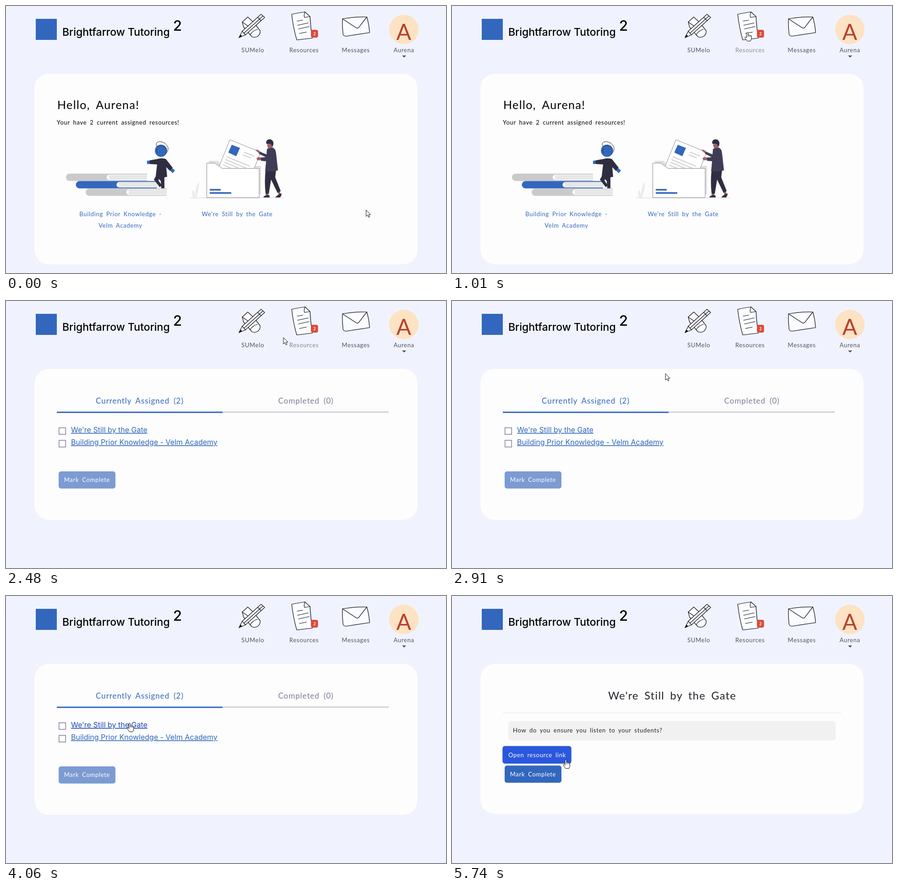
Recreate the animation shown at these times as an HTML page. Size 961 by 583 pixels, loop 6.29 s.

```html
<!DOCTYPE html>
<html lang="en">
<head>
<meta charset="utf-8">
<title>Learning dashboard</title>
<style>
  html, body { margin: 0; width: 100%; height: 100%; overflow: hidden; background: #f0f3fd; }
  svg { display: block; width: 100%; height: 100%; }
  text { font: 13px Lato, sans-serif; letter-spacing: .055em; word-spacing: .22em; }
  .mid { text-anchor: middle; }
  .nav text { fill: #51515c; }
  .brand { font: 500 23px Inter, sans-serif; letter-spacing: 0; word-spacing: 0; }
  .link { font: 16px Inter, sans-serif; letter-spacing: 0; word-spacing: 0; text-decoration: underline; fill: #2f66b9; }
  .tab { font-size: 17px; }
  .blue { fill: #3267bd; }
  .white { fill: #fff; }
  .dark { fill: #2f2e41; }
  .skin { fill: #a0616a; }
  .sketch { fill: none; stroke: #16161f; stroke-width: 1.25; stroke-linecap: round; stroke-linejoin: round; }
  .sketch .paper { fill: #fbfcff; }
  .shadow { fill: #d5dff4; }
  .rule { fill: none; stroke: #c4c4c6; }
</style>
</head>
<body>
<svg viewBox="0 0 961 583">
  <rect width="961" height="583" fill="#f0f3fd"/>

  <rect class="blue" x="65" y="28" width="46" height="46"/>
  <text class="brand" x="123" y="65">Brightfarrow Tutoring</text>
  <text class="brand" x="365" y="54" style="font-size:31px">2</text>

  <g class="sketch">
    <path class="paper" d="M516 35L528 24L541 36L555 54Q556 61 550 66Q543 70 537 67L519 46Z"/>
    <path d="M516 35L529 44L541 36M533 63Q538 54 549 51"/>
    <path class="paper" d="M509 69L516 55L557 18L565 25L523 63Z"/>
    <path d="M516 55L523 63M520 59L561 22M550 25L557 32"/>
    <path d="M509 69L512 63L515 66Z" fill="#16161f"/>
  </g>

  <path class="shadow" d="M626 21L656 15L666 25L671 71L637 76Z"/>
  <g class="sketch">
    <path class="paper" d="M624 18Q638 15 653 13L664 23Q665 48 669 70Q652 72 635 74Q627 46 624 18Z"/>
    <path d="M653 13Q650 20 652 25L664 23M636 33L648 31M637 42L660 37M639 50L662 45M641 60L656 57"/>
  </g>
  <rect x="666" y="52" width="15.5" height="17" rx="4" fill="#dc4b3b"/>
  <text class="mid white" x="674" y="64" style="font-size:9px;font-weight:700">2</text>

  <path class="shadow" d="M737 30L790 25L795 60L742 67Z"/>
  <g class="sketch">
    <path class="paper" d="M735 28Q762 23 788 24Q793 40 794 58Q768 62 742 66Q735 65 736 58Q734 42 735 28Z"/>
    <path d="M735 28Q750 38 764 47Q768 50 771 46L788 24"/>
  </g>

  <circle cx="869" cy="51.3" r="32.2" fill="#fde3c3"/>
  <text class="mid" x="870" y="73.5" style="font-size:48px;fill:#b7402f">A</text>
  <path d="M865 108H874L869.5 112.5Z" fill="#51515c"/>
  <g class="nav mid">
    <text x="539" y="101">SUMelo</text>
    <text id="resources" x="651" y="101">Resources</text>
    <text x="764" y="101">Messages</text>
    <text x="869" y="101">Aurena</text>
  </g>

  <rect id="card" x="62" y="148" width="837" height="416" rx="32" fill="#fdfdfe"/>

  <g class="screen">
    <text x="112" y="225" style="font-size:25px">Hello, Aurena!</text>
    <text x="111" y="259">Your have 2 current assigned resources!</text>

    <g id="books"></g>
    <circle class="blue" cx="338.5" cy="316" r="13.3"/>
    <path d="M330 308Q324 297 336 296Q349 297 354 309Q355 319 347 323M330 308Q336 301 344 306Q352 311 350 317M331 311Q327 317 332 321" fill="none" stroke="#2f2e41"/>
    <path class="blue" d="M308 338L315 337V345L308 345ZM362 353L369 359L364 365L358 359Z"/>
    <path class="dark" d="M314 337L331 334Q340 331 349 334L353 339L364 353L358 360L350 352L352 373L346 374V398H339L338 382L334 378L333 381L340 391L336 396L323 379L327 372L330 346L314 345Z"/>

    <path class="rule" d="M401 419H608" stroke-width=".7"/>
    <path d="M408 418Q404 404 409 401Q412 406 413 416Q413 392 422 384Q421 405 415 418Z" fill="#ececec"/>
    <path d="M443 343V338H463L471 349H557V411H553V419H443Z" fill="#e1e1e3"/>
    <path d="M489 292L556 319L540 360L464 354Z" fill="#fff" stroke="#8e8e96"/>
    <path class="blue" d="M493 303L511 310L503 328L485.500 320Z"/>
    <path class="rule" stroke-width="1.6" d="M520 319L542 328M517 325L535 332M482 329L533 350M479 335L524 354M477 341L508 354M474 347L491 354"/>
    <path d="M438.500 343H456L472 354.500H553V418.500H438.500Z" fill="#fff" stroke="#85858f"/>
    <path class="blue" d="M445 399.500H469V403H445ZM445 406.500H492V410H445Z"/>

    <path class="skin" d="M570 302H582L581 313H573ZM544 314L550 314L558 320L555 324ZM547 332L551 330L560 331V336L549 337ZM567 408H573V415H567ZM593 406L598 404L600 412L596 414Z"/>
    <path class="dark" d="M568 298Q569 291 576 291Q585 292 584 302L582 308L579 302L569 301ZM567 357H590L588 374L600 404L593 408L579 379L574 410H567Q564 385 567 357ZM562 418Q563 413 575 413L576 418ZM588 418Q593 412 601 409L602 412L599 418Z"/>
    <path d="M554 318L569 324L570 312L582 309Q589 311 590 323L594 359L583 361H566L568 339L557 338V331L567 330L553 323Z" fill="#3f3d56"/>

    <g class="mid blue">
      <text x="250" y="459">Building Prior Knowledge -</text>
      <text x="250" y="484">Velm Academy</text>
      <text x="505" y="459">We're Still by the Gate</text>
    </g>
  </g>

  <g class="screen">
    <text class="tab mid blue" x="292" y="224">Currently Assigned (2)</text>
    <text class="tab mid" x="655" y="224" fill="#7d7b96">Completed (0)</text>
    <path d="M473 242.500H836" stroke="#8b8a9c"/>
    <path d="M111 243H473" stroke="#3267bd" stroke-width="3"/>
    <path d="M115.750 276.750h14.500v14.500h-14.500zM115.750 304.250h14.500v14.500h-14.500z" fill="#fff" stroke="#827f97" stroke-width="1.500"/>
    <text id="lesson" class="link" x="142" y="287">We're Still by the Gate</text>
    <text class="link" x="142" y="314">Building Prior Knowledge - Velm Academy</text>
    <rect x="115" y="372" width="124" height="37.500" rx="5" fill="#7c9bd3"/>
    <text class="mid white" x="177" y="395">Mark Complete</text>
  </g>

  <g class="screen">
    <text class="mid" x="481" y="226" style="font-size:23.5px" fill="#212529">We're Still by the Gate</text>
    <path d="M111 255.500H850" stroke="#e3e3e5"/>
    <rect x="123" y="273" width="715" height="42.500" rx="8" fill="#f1f1f1"/>
    <text x="133" y="298" fill="#212529">How do you ensure you listen to your students?</text>
    <rect class="blue" x="110.500" y="327.700" width="150" height="38.300" rx="5"/>
    <rect id="openHover" x="110.500" y="327.700" width="150" height="38.300" rx="5" fill="#2a57dc"/>
    <text class="mid white" x="186" y="352">Open resource link</text>
    <rect class="blue" x="115" y="370.300" width="124" height="37.500" rx="5"/>
    <text class="mid white" x="177" y="394">Mark Complete</text>
  </g>

  <g id="cursor" fill="#fff" stroke="#111" stroke-linejoin="round">
    <path id="arrow" d="M.5 .5V14.500L3.700 11.500L6 16.500L8.300 15.500L6 10.700H10.300Z"/>
    <g id="hand">
      <path d="M-1.500 1.500Q0 -.7 1.500 1.500V6.500Q3.500 5.300 4.300 7Q6 6 7 7.700Q9 6.900 9 9V14L7 19.500H-.5L-5 13Q-5.800 10.500 -3.500 10.500L-1.500 12.500Z"/>
      <path d="M1.500 6.500V10.500M4.300 7V10.500M7 7.700V10.500" fill="none" stroke-width=".8"/>
    </g>
  </g>
</svg>
<script>
const LOOP = 6290;
const $ = id => document.getElementById(id);
const show = (el, on) => { el.style.display = on ? '' : 'none'; };
const ramp = (t, start, length) => Math.min(1, Math.max(0, (t - start) / length));
const smooth = p => (1 - Math.cos(Math.PI * p)) / 2;

// Three stacked books, each one shifted to the right.
$('books').innerHTML = ['#cacaca', '#3267bd', '#cacaca'].map((color, i) => {
  const lines = [3, 5.5, 8, 10.5].map(y => `M94 ${y + 1}H177`).join('');
  return `<g transform="translate(${131 + i * 21.5} ${366 + i * 16.3})">
    <path d="M8 0H177V16H8A8 8 0 0 1 8 0Z" fill="${color}"/>
    <path d="M95 2H177V14H95A6 6 0 0 1 95 2Z" fill="#fff"/>
    <path class="rule" d="${lines}"/></g>`;
}).join('');

// Pointer stops: time, x, y, and whether the move towards it is eased.
const path = [
  [0, 786, 445], [730, 641, 54, true], [790, 640, 52], [840, 645, 57],
  [2340, 645, 57], [2430, 622, 70], [2910, 466, 158], [2960, 453, 164],
  [3400, 310, 249], [3600, 274, 270], [3700, 268, 275], [3930, 268, 275],
  [4060, 270, 277], [5240, 270, 277], [5740, 248.5, 357, true], [LOOP, 248.5, 357]
];
const pages = [[0, 416], [1860, 330], [4970, 328]];
const screens = document.querySelectorAll('.screen');

function pointerAt(t) {
  const i = path.findIndex(stop => stop[0] > t);
  const [t0, x0, y0] = path[i - 1], [t1, x1, y1, eased] = path[i];
  const p = ramp(t, t0, t1 - t0), k = eased ? smooth(p) : p;
  return [x0 + (x1 - x0) * k, y0 + (y1 - y0) * k];
}

function draw(t) {
  const page = pages.filter(([start]) => t >= start).length - 1;
  screens.forEach((el, i) => show(el, i === page));
  $('card').setAttribute('height', pages[page][1]);

  const navHover = page === 0 ? ramp(t, 630, 150) : ramp(t, 1860, 150) - ramp(t, 2460, 150);
  $('resources').style.opacity = 1 - .36 * navHover;
  $('lesson').style.fill = t >= 3650 ? '#1d46b4' : '';
  $('openHover').style.opacity = ramp(t, 5560, 150);

  const onLink = t >= 610 && t < 2450 || t >= 3650 && t < 4970 || t >= 5560;
  show($('hand'), onLink);
  show($('arrow'), !onLink);
  $('cursor').setAttribute('transform', `translate(${pointerAt(t)})`);
}

function tick() {
  draw(performance.now() % LOOP);
  requestAnimationFrame(tick);
}
tick();
</script>
</body>
</html>
```
